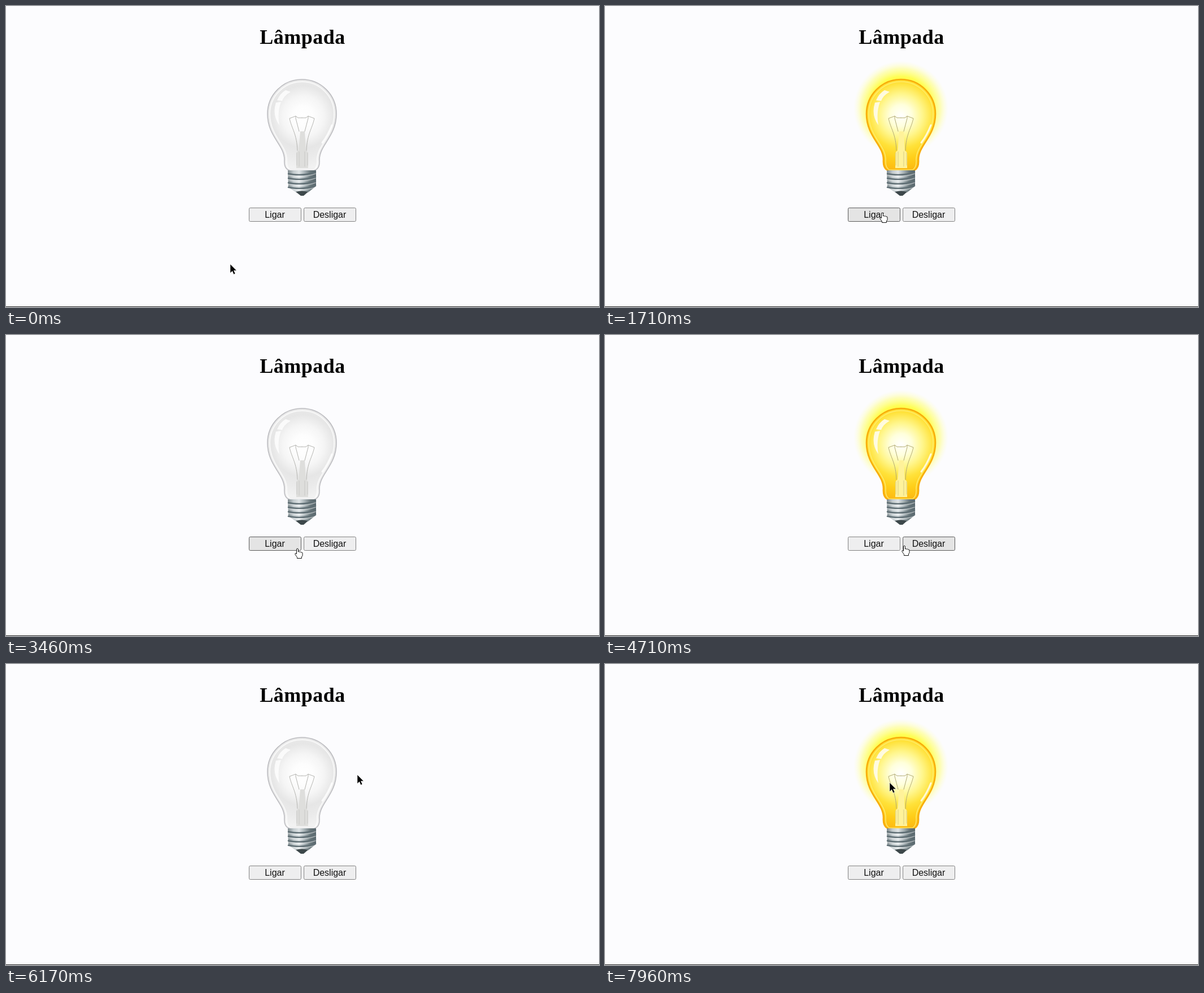
Animation of 1050 by 533 pixels, one loop 8 s. Source, as an HTML page:

```html
<!DOCTYPE html>
<html lang="pt">
<head>
<meta charset="utf-8">
<title>Lâmpada</title>
<style>
  html, body { margin: 0; width: 100%; height: 100%; overflow: hidden; background: #fcfcfe; }
  svg { position: absolute; left: 0; top: 0; display: block; }
  .title { font: bold 36px "Liberation Serif", "Times New Roman", serif; letter-spacing: .5px; text-anchor: middle; }
  .button rect { fill: #eeeeef; stroke: #818181; }
  .button text { font: 16px "Liberation Sans", Arial, sans-serif; text-anchor: middle; fill: #111; }
  .button.hover rect { fill: #e4e4e4; stroke: #5a5a5a; }
  .line { fill: none; stroke-linecap: round; stroke-linejoin: round; }
</style>
</head>
<body>
<svg width="1050" height="533" viewBox="0 0 1050 533">
  <defs>
    <radialGradient id="glow" gradientUnits="userSpaceOnUse" cx="0" cy="181" r="84"></radialGradient>
    <radialGradient id="glassOn" gradientUnits="userSpaceOnUse" cx="0" cy="194" r="96"></radialGradient>
    <radialGradient id="glassOff" gradientUnits="userSpaceOnUse" cx="2" cy="196" r="92"></radialGradient>
    <linearGradient id="metal"></linearGradient>
    <path id="glass"/>
    <path id="inner"/>
    <path id="stem" d="M-3 222H5L7 256Q11 258 11 262V287H-10V262Q-10 258 -6 256Z"/>
    <path id="wire" d="M0 198H7L11 195L22 199C18 218 9 226 8 256M11 195V199L5 222"/>
    <g id="wires" class="line">
      <use href="#wire"/>
      <use href="#wire" transform="scale(-1 1)"/>
      <path d="M-9 260V282M-5 258V284M5 258V284M10 260V282" opacity=".5"/>
    </g>
  </defs>

  <text class="title" x="525" y="67">Lâmpada</text>

  <g transform="translate(524 0)">
    <g id="off">
      <use href="#glass" fill="url(#glassOff)" stroke="#bcbcc0" stroke-width="1.6"/>
      <use href="#inner" class="line" stroke="#fff" stroke-width="2" opacity=".7"/>
      <use href="#stem" fill="#dededc"/>
      <use href="#wires" stroke="#b4b4b0"/>
    </g>
    <g id="on">
      <circle cy="181" r="84" fill="url(#glow)"/>
      <use href="#glass" fill="url(#glassOn)" stroke="#f8ac0b" stroke-width="2.6"/>
      <use href="#inner" class="line" stroke="#ffef78" stroke-width="1.6" opacity=".8"/>
      <use href="#stem" fill="#fff29a"/>
      <use href="#wires" stroke="#b1aa75"/>
    </g>
    <g fill="#fff" opacity=".8">
      <path d="M-44 167Q-39 155 -29 149L-20 152Q-32 159 -35 168Z"/>
      <path d="M-46 171L-37 170Q-44 188 -40 211Q-53 193 -46 171Z"/>
      <path class="line" d="M53 211Q46 229 36 242" stroke="#fff" stroke-width="3"/>
    </g>
    <path d="M-25 291H25V319L11 330H-10L-24 321Z" fill="url(#metal)"/>
    <g id="threads" class="line"></g>
    <path d="M-11 329Q0 326 11 329L3 336H-2Z" fill="#3d484b"/>
  </g>

  <g id="buttons"></g>
  <rect y="532" width="1050" height="1" fill="#222"/>

  <g id="cursor">
    <path id="arrow" d="M0 0V16L3.7 12.5L6.2 18.2L9 17L6.5 11.4H11.3Z" stroke="#fff" stroke-width=".6"/>
    <path id="hand" d="M-1.5 1Q0 -1 1.4 1V6Q3 4.7 4.2 6.4Q5.8 5.2 6.8 7Q8.6 6.2 9 8.2V12.5L7.4 15V17.5H-.5V15.5L-4 10.5Q-4.6 8.4 -2.8 8.5L-1.5 9.8Z" fill="#fff" stroke="#111" stroke-linejoin="round"/>
  </g>
</svg>
<script>
const LOOP = 8000;
const find = id => document.getElementById(id);
const show = (id, visible) => find(id).style.display = visible ? "" : "none";

// Evenly spaced colour stops
function shade(id, colors) {
  const list = colors.split(" ");
  find(id).innerHTML = list.map((color, i) =>
    `<stop offset="${i / (list.length - 1)}" stop-color="${color}"/>`).join("");
}
shade("glow", "#ffff2e #ffff2e #ffff2e #ffff2e #ffff3ce0 #ffff7080 #ffffc000");
shade("glassOn", "#fff #ffffdc #fff68c #ffe23a #ffcf1a #fdbb12");
shade("glassOff", "#fff #fdfdfd #f5f5f5 #e6e6e6 #ebebeb #f2f2f2");
shade("metal", "#7d898d #c2cacd #dfe4e6 #a5b0b4 #69777b #55646a");

// Bulb outline: round head flowing into a narrow neck
function outline(inset) {
  const r = 61 - inset, n = 31 - inset;
  return `M${6 - n} 290Q${-n - 1} 286 ${-n} 272C${-n} 246 ${-r} 231 ${-r} 191` +
    `A${r} ${r} 0 0 1 ${r} 191C${r} 231 ${n} 246 ${n} 272Q${n + 1} 286 ${n - 6} 290Z`;
}
find("glass").setAttribute("d", outline(0));
find("inner").setAttribute("d", outline(4));

const thread = (y, color, width) =>
  `<path d="M-24 ${y}Q2 ${y + 5} 24 ${y - 3}" stroke="${color}" stroke-width="${width}"/>`;
for (let y = 297; y < 322; y += 8) {
  find("threads").innerHTML += thread(y, "#5f6e74", 2.4) + thread(y + 3, "#ffffff70", 1.6);
}

const buttons = ["Ligar", "Desligar"].map((label, i) => ({ label, left: 430 + i * 97 }));
find("buttons").innerHTML = buttons.map(({ label, left }) =>
  `<g class="button"><rect x="${left + .5}" y="357.5" width="92" height="24" rx="2"/>` +
  `<text x="${left + 46}" y="375">${label}</text></g>`).join("");

// Pointer stops: time, x, y
const stops = [
  [0, 397, 458], [720, 575, 53], [920, 584, 167], [1090, 502, 392], [1170, 491, 366],
  [1710, 491, 366], [2210, 578, 371], [3460, 516, 378], [4710, 530, 373], [5200, 556, 371],
  [5850, 868, 260], [6170, 622, 196], [6710, 540, 326], [7000, 480, 342], [7330, 378, 229],
  [7710, 378, 224], [7960, 504, 210]
];
const clicks = [1460, 2400, 3700, 5050];
const HOVER_FROM = 6000;

function pointAt(t) {
  const next = stops.findIndex(stop => stop[0] > t);
  if (next < 0) return stops[stops.length - 1].slice(1);
  const [t0, x0, y0] = stops[next - 1], [t1, x1, y1] = stops[next];
  const part = (t - t0) / (t1 - t0);
  return [x0 + (x1 - x0) * part, y0 + (y1 - y0) * part];
}

// Clicks switch the lamp; later it lights while the pointer is over it
function isLit(t, x) {
  if (t > HOVER_FROM) return x > 436 && x < 613;
  return clicks.filter(time => time <= t).length % 2 === 1;
}

function draw(t) {
  const [x, y] = pointAt(t);
  const hits = buttons.map(({ left }) => x >= left && x <= left + 93 && y >= 357 && y <= 382);
  hits.forEach((hit, i) => find("buttons").children[i].classList.toggle("hover", hit));
  const over = hits.includes(true), lit = isLit(t, x);
  show("on", lit);
  show("off", !lit);
  show("hand", over);
  show("arrow", !over);
  find("cursor").setAttribute("transform", `translate(${Math.round(x)} ${Math.round(y)})`);
}

const start = performance.now();
function tick() {
  draw((performance.now() - start) % LOOP);
  requestAnimationFrame(tick);
}
tick();
</script>
</body>
</html>
```
